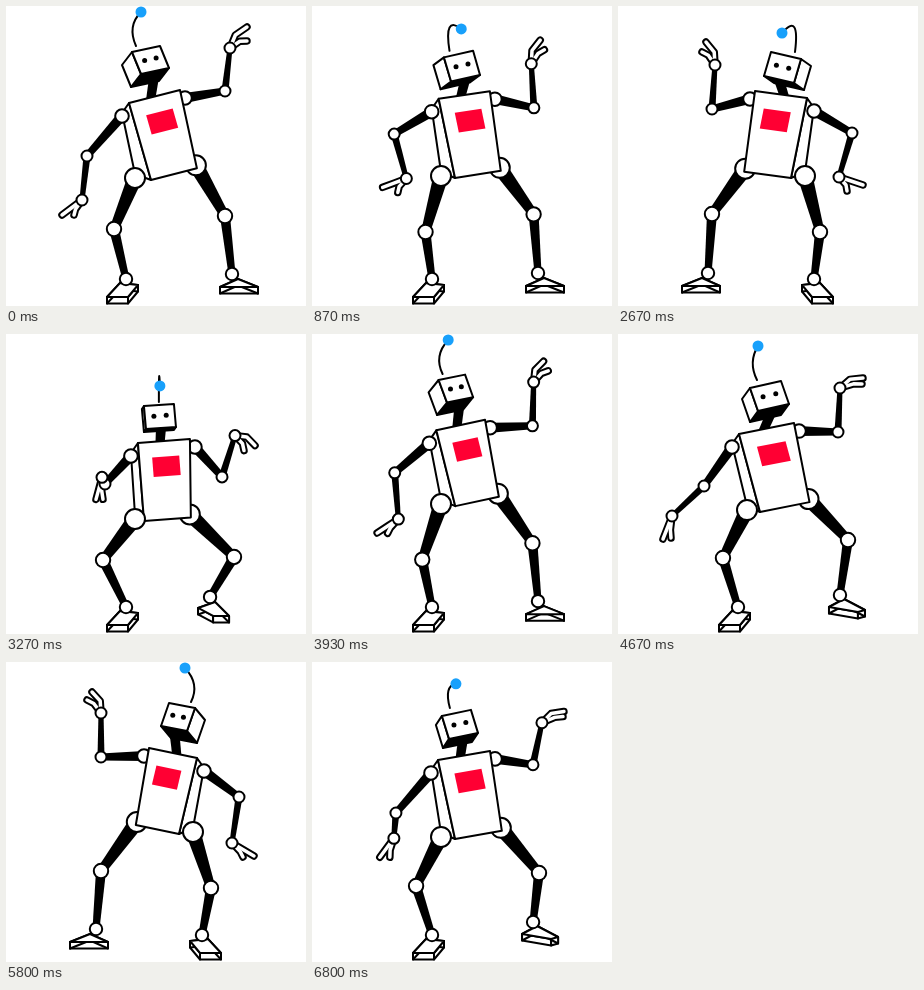
An HTML page with a canvas that plays this animation: 300 by 300 pixels, repeating every 6860 ms.

```html
<!DOCTYPE html>
<html>
<head>
<meta charset="utf-8">
<style>
html, body { margin: 0; width: 100%; height: 100%; overflow: hidden; background: #fff; }
canvas { display: block; }
</style>
</head>
<body>
<canvas id="stage" width="300" height="300"></canvas>
<script>
const ctx = document.getElementById('stage').getContext('2d');
const HALF = 1715;   // one lean; the next lean is its mirror image
const AXIS = 316;    // mirroring maps x to AXIS - x
const SWAP = -185;   // moment the body passes through upright
const TIMES = [-160, -115, -60, 0, 655, 955, 1240];
const N = TIMES.length;

// Joint positions (x, y) at each key time; a single pair stays put.
const tracks = {
  chestL: [132,109, 123,102, 126,98, 123,97, 125,96, 127,92, 121,100],
  chestR: [184,105, 176,94, 178,89, 174,84, 173,86, 179,85, 176,89],
  waistL: [138,187, 139,179, 143,177, 145,174, 143,172, 143,172, 142,178],
  elbowL: [99,150, 92,147, 84,151, 81,150, 83,135, 82,127, 86,152],
  elbowR: [216,143, 225,115, 221,103, 219,85, 221,95, 222,103, 220,98],
  wristL: [96,143, 91,161, 82,176, 76,194, 90,181, 95,171, 54,182],
  wristR: [229,102, 232,71, 230,61, 224,42, 221,51, 219,59, 222,54],
  tipL: [90,165, 76,182, 68,195, 56,209, 68,194, 71,179, 45,205],
  tipR: [249,112, 254,80, 252,50, 241,21, 230,30, 228,36, 245,44],
  thumbL: [97,165, 86,179, 78,195, 68,209, 79,195, 87,185, 53,204],
  thumbR: [238,117, 243,83, 251,55, 241,35, 235,38, 232,46, 244,50],
  kneeL: [97,226, 100,227, 104,224, 108,223, 111,226, 114,226, 105,224],
  kneeR: [228,223, 221,211, 227,211, 219,210, 221,209, 222,208, 230,206],
  ankleL: [120,273],
  ankleR: [204,263, 216,260, 221,260, 226,268, 226,267, 226,267, 222,261],
  headL: [138,72, 134,57, 130,54, 126,46, 127,46, 133,53, 132,54],
  headR: [168,70, 163,54, 159,48, 154,40, 153,41, 163,46, 163,47],
  jawL: [140,95, 138,81, 137,77, 135,68, 135,69, 140,77, 140,77],
  root: [153,68, 143,50, 138,46, 130,40, 131,40, 139,46, 139,46],
  bend: [153,26, 143,12, 132,24, 121,20, 122,22, 134,6, 130,28],
  ball: [154,52, 146,33, 144,22, 135,6, 137,6, 152,27, 140,12]
};
const headDepth = [-2,3, -5,6, -6,9, -10,13, -10,12, -10,7, -8,11];

// Feet relative to the ankle: inner heel, inner toe, outer toe, outer heel.
const FOOT = ['inHeel', 'inToe', 'outToe', 'outHeel'];
const planted = [12,6, 2,18, -19,18, -6,4];
const front = [-12,11, 3,19, 19,19, 5,5];
const turned = [-11,12, 18,17, 25,15, 4,4];
const side = [-12,13, 26,13, 26,13, 6,5];
const rightFoot = [front, turned, turned, side, side, side, turned];

const add = (a, b, k = 1) => [a[0] + b[0] * k, a[1] + b[1] * k];
const sub = (a, b) => add(a, b, -1);
const mid = (a, b) => [(a[0] + b[0]) / 2, (a[1] + b[1]) / 2];
const pick = (list, i) => {
  const k = list.length === 2 ? 0 : 2 * i;
  return [list[k], list[k + 1]];
};

const poses = TIMES.map((_, i) => {
  const p = {};
  for (const name in tracks) p[name] = pick(tracks[name], i);
  p.waistR = add(p.waistL, sub(p.chestR, p.chestL), 0.9);
  p.shoulderL = add(p.chestL, [-7, 13]);
  p.shoulderR = add(p.chestR, [5, 8]);
  p.hipL = [129, p.waistL[1] - 2];
  p.hipR = add(p.waistR, [-1, -3]);
  p.jawR = add(p.jawL, sub(p.headR, p.headL));
  p.back = add(mid(p.headR, p.jawL), pick(headDepth, i));
  FOOT.forEach((name, k) => {
    p[name + 'L'] = add(p.ankleL, pick(planted, k));
    p[name + 'R'] = add(p.ankleR, pick(rightFoot[i], k));
  });
  return p;
});

const twin = name => name.replace(/[LR]$/, c => c === 'L' ? 'R' : 'L');
const mirrored = poses.map(p => {
  const q = {};
  for (const name in p) q[name] = [AXIS - p[twin(name)][0], p[twin(name)][1]];
  return q;
});

function key(i) {
  const turn = Math.floor(i / N), k = i - turn * N;
  return { t: TIMES[k] + turn * HALF, pose: (turn % 2 ? mirrored : poses)[k] };
}

// Cubic through four keys, without overshoot.
function curve(k, v, t) {
  const slope = i => (v[i + 1] - v[i]) / (k[i + 1].t - k[i].t);
  const tangent = (a, b) => a * b <= 0 ? 0 : 2 * a * b / (a + b);
  const s = slope(1), h = k[2].t - k[1].t, u = (t - k[1].t) / h;
  const m1 = tangent(slope(0), s) * h, m2 = tangent(s, slope(2)) * h;
  const w = u * u * (3 - 2 * u);
  return v[1] + (v[2] - v[1]) * w + u * (1 - u) * (m1 * (1 - u) - m2 * u);
}

function poseAt(t) {
  let i = -1;
  while (key(i + 1).t <= t) i++;
  const k = [-1, 0, 1, 2].map(d => key(i + d)), p = {};
  for (const name in poses[0])
    p[name] = [0, 1].map(c => curve(k, k.map(e => e.pose[name][c]), t));
  return p;
}

function path(points, close = true) {
  ctx.beginPath();
  points.forEach(q => ctx.lineTo(...q));
  if (close) ctx.closePath();
}
function face(points, fill = '#fff') {
  path(points);
  ctx.fillStyle = fill;
  ctx.fill();
  ctx.stroke();
}
function fillShape(points, fill) {
  path(points);
  ctx.fillStyle = fill;
  ctx.fill();
}
function disc(c, r, fill, line) {
  ctx.beginPath();
  ctx.arc(c[0], c[1], r, 0, 7);
  ctx.fillStyle = fill;
  ctx.fill();
  if (line) ctx.stroke();
}
const joint = (c, r) => disc(c, r, '#fff', true);

function limb(a, b, wa, wb) {
  const d = sub(b, a), len = Math.hypot(...d) || 1;
  const n = [-d[1] / len, d[0] / len];
  fillShape([add(a, n, wa / 2), add(b, n, wb / 2), add(b, n, -wb / 2), add(a, n, -wa / 2)], '#000');
}

function hand(wrist, tip, thumb, arch) {
  const d = sub(tip, wrist), len = Math.hypot(...d) || 1;
  const knuckle = add(mid(wrist, tip), [d[1] / len, -d[0] / len], arch);
  const fingers = [[wrist, knuckle, tip], [wrist, mid(mid(wrist, knuckle), thumb), thumb]];
  for (const [color, width] of [['#000', 7.5], ['#fff', 3.5]]) {
    ctx.strokeStyle = color;
    ctx.lineWidth = width;
    for (const f of fingers) { path(f, false); ctx.stroke(); }
  }
  ctx.strokeStyle = '#000';
  ctx.lineWidth = 2;
}

function arm(p, s, arch) {
  const shoulder = p['shoulder' + s], elbow = p['elbow' + s], wrist = p['wrist' + s];
  limb(shoulder, elbow, 10, 7);
  limb(elbow, wrist, 7, 5);
  hand(wrist, p['tip' + s], p['thumb' + s], arch);
  joint(shoulder, 6.8);
  joint(elbow, 5.5);
  joint(wrist, 5.5);
}

function leg(p, s) {
  const hip = p['hip' + s], knee = p['knee' + s], ankle = p['ankle' + s];
  const top = FOOT.map(name => p[name + s]);
  top.forEach((a, i) => {
    const b = top[(i + 1) % 4];
    face([a, b, add(b, [0, 6.5]), add(a, [0, 6.5])]);
  });
  face(top);
  limb(hip, knee, 15, 9);
  limb(knee, ankle, 10, 7);
  joint(hip, 10);
  joint(knee, 7.2);
  joint(ankle, 6.2);
}

function torso(p) {
  const u = sub(p.chestR, p.chestL), v = sub(p.waistL, p.chestL);
  const at = (x, y) => add(add(p.chestL, u, x), v, y);
  face([p.chestL, add(p.shoulderL, [0, -3]), add(p.hipL, [0, -4]), p.waistL]);
  face([p.chestL, p.chestR, p.waistR, p.waistL]);
  fillShape([at(.25, .2), at(.77, .2), at(.77, .45), at(.25, .45)], '#ff0033');
}

function head(p) {
  const { headL, headR, jawL, jawR } = p;
  const depth = sub(p.back, mid(headR, jawL));
  const u = sub(headR, headL), v = sub(jawL, headL);
  face([jawL, jawR, add(jawR, depth), add(jawL, depth)], '#000');
  face([headL, add(headL, depth), add(jawL, depth), jawL]);
  face([headL, headR, jawR, jawL]);
  for (const x of [.3, .71]) disc(add(add(headL, u, x), v, .47), 2.5, '#000');
}

function antenna(p) {
  ctx.beginPath();
  ctx.moveTo(...p.root);
  ctx.quadraticCurveTo(...p.bend, ...p.ball);
  ctx.stroke();
  disc(p.ball, 5.5, '#18a0fb');
}

function draw(now) {
  const t = now % (2 * HALF);
  const lean = Math.floor((t - SWAP) / HALF);
  const p = poseAt(t - lean * HALF);
  ctx.setTransform(1, 0, 0, 1, 0, 0);
  ctx.fillStyle = '#fff';
  ctx.fillRect(0, 0, 300, 300);
  if (lean % 2) ctx.setTransform(-1, 0, 0, 1, AXIS, 0);
  ctx.lineWidth = 2;
  ctx.lineJoin = ctx.lineCap = 'round';
  ctx.strokeStyle = '#000';

  leg(p, 'R');
  arm(p, 'R', 4);
  limb(mid(p.jawL, p.jawR), add(mid(p.chestL, p.chestR), [-4, 4]), 10, 9);
  torso(p);
  leg(p, 'L');
  arm(p, 'L', 0);
  antenna(p);
  head(p);
}

const start = performance.now();
function tick() {
  draw(performance.now() - start);
  requestAnimationFrame(tick);
}
tick();
</script>
</body>
</html>
```
